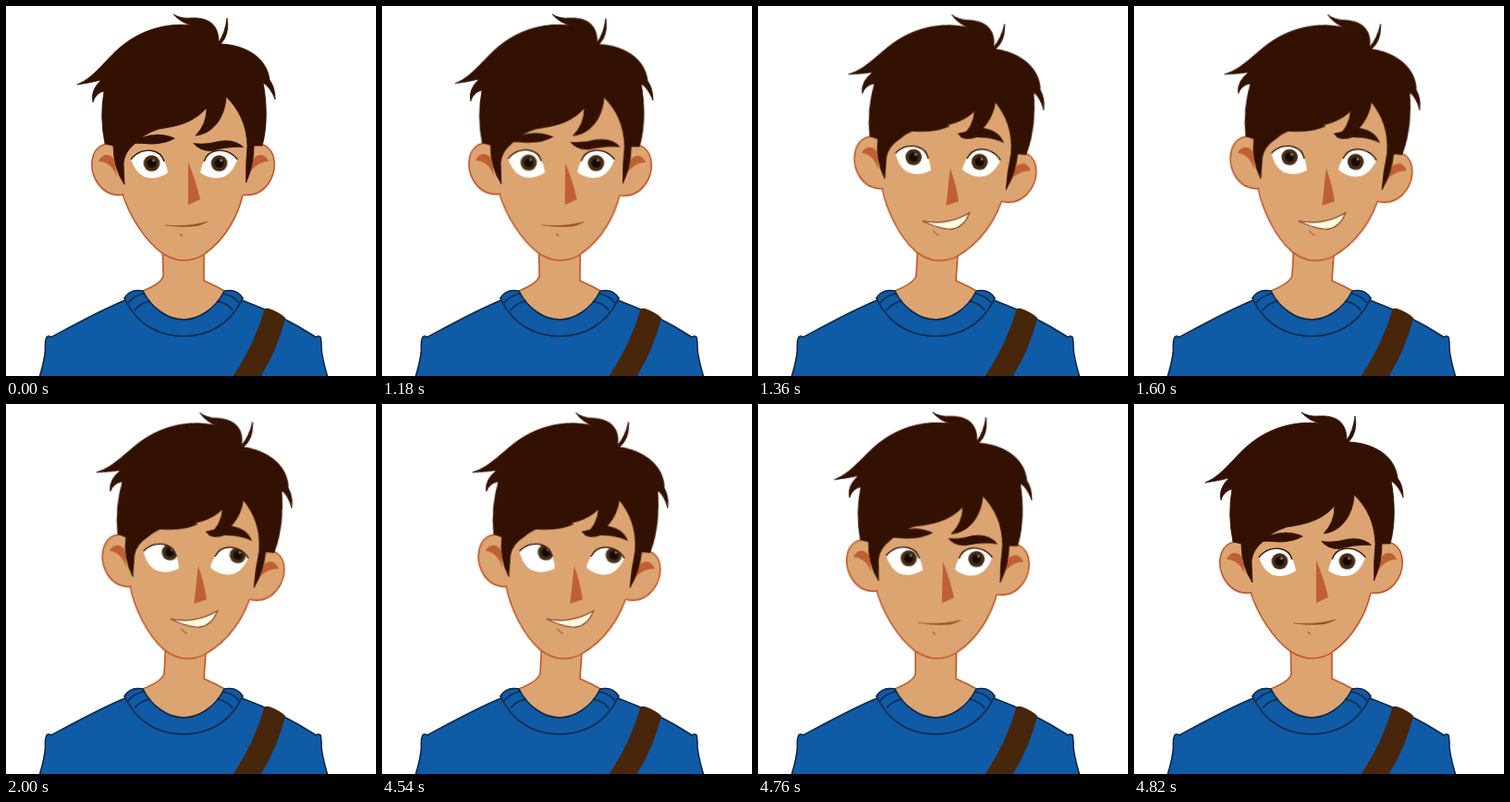
An HTML page for the animation above (5 s loop, 400 by 400 pixels).

```html
<!DOCTYPE html>
<html lang="en">
<head>
<meta charset="utf-8">
<title>Head tilt</title>
<style>
  html, body { margin: 0; width: 100%; height: 100%; overflow: hidden; background: #fff; }
  svg { display: block; width: 100%; height: 100%; }

  .skin { fill: #dca470; }
  .line { fill: none; stroke: #c4562b; stroke-width: 1.6; }
  .shade { fill: #c05f33; }
  .hair { fill: #331102; }
  .seam { fill: none; stroke: #0c2747; stroke-width: 1.6; }

  .move { animation: 5s linear infinite; }

  #head { transform-origin: 192px 275px; animation-name: tilt; }
  @keyframes tilt {
    0%, 23.2%, 96.4%, 100% { transform: rotate(0deg); }
    27.2%, 92% { transform: rotate(6.1deg); }
  }

  #neck { animation-name: neck; }
  @keyframes neck {
    0%, 23.2%, 96.4%, 100% { d: path("M169 255L170 291Q170 299 148 308L160 350L224 350L236 308Q226 302 214 297L214 255"); }
    27.2%, 92% { d: path("M173 255L171 291Q170 299 148 308L160 350L224 350L236 308Q226 302 214 297L217 255"); }
  }

  #nose { animation-name: nose; }
  @keyframes nose {
    0%, 23.2%, 96.4%, 100% { d: path("M197 169Q205 188 210 209L197 215Z"); }
    27.2%, 92% { d: path("M197 174Q205 190 210 209L197 215Z"); }
  }

  #mouth { animation-name: mouth; }
  @keyframes mouth {
    0%, 25.4%, 94%, 100% { d: path("M172 237Q197 239 218 233Q209 238 203 238Q189 239.5 172 237Z"); fill: #9a4c22; stroke-width: .4px; }
    25.8%, 93.6% { fill: #fff9e4; }
    27.2%, 92% { d: path("M173 234Q200 237 223 220Q218 238 203 240Q189 240 173 234Z"); fill: #fff9e4; stroke-width: 1.1px; }
  }

  #chin { animation-name: chin; }
  @keyframes chin {
    0%, 25.4%, 94%, 100% { d: path("M188 246Q189 248 191 249"); }
    27.2%, 92% { d: path("M186 243Q189 247 193 248"); }
  }

  #browL { animation-name: browL; }
  @keyframes browL {
    0%, 23.2%, 96.4%, 100% { d: path("M132 150Q158 132 183 143Q170 151 150 149Q140 148 132 150Z"); }
    27.2%, 92% { d: path("M134 140Q160 118 192 129Q178 138 152 139Q142 139 134 140Z"); }
  }

  #browR { animation-name: browR; }
  @keyframes browR {
    0%, 23.2%, 96.4%, 100% { d: path("M202 148Q216 150 230 146Q248 143 257 153Q240 152 222 157Q209 157 202 148Z"); }
    27.2%, 92% { d: path("M201 136Q214 132 222 127Q245 126 252 141Q240 136 222 138Q209 145 201 136Z"); }
  }

  #eyeL { animation-name: eyeL; }
  @keyframes eyeL {
    0%, 23.2%, 96.4%, 100% { transform: translate(0, 0); }
    27.2%, 92% { transform: translate(1.5px, -1.5px); }
  }

  #eyeR { animation-name: eyeR; }
  @keyframes eyeR {
    0%, 23.2%, 96.4%, 100% { transform: translate(0, 0); }
    27.2%, 92% { transform: translate(0, -6px); }
  }

  #irisL { animation-name: irisL; }
  @keyframes irisL {
    0%, 23.2%, 96.4%, 100% { transform: translate(157.5px, 170px); }
    27.2%, 36% { transform: translate(155px, 168px); }
    40%, 92.8% { transform: translate(163.6px, 164px); }
  }

  #irisR { animation-name: irisR; }
  @keyframes irisR {
    0%, 23.2%, 96.4%, 100% { transform: translate(230.5px, 170px); }
    27.2%, 36% { transform: translate(228px, 170px); }
    40%, 92.8% { transform: translate(238.4px, 163.8px); }
  }
</style>
</head>
<body>
<svg viewBox="0 0 400 400">
  <defs>
    <path id="white" d="M135 166C141 158 150 155 158 156.500C167 158 173 168 175 180C170 184 163 186 157 186C146 186 139 177 135 166Z"/>
    <path id="lid" d="M135 166C141 158 150 155 158 156.500C164 157.500 169 162 171 168" fill="none" stroke="#331102" stroke-width="1.400"/>
    <g id="iris">
      <circle r="8.800" fill="#482c13"/>
      <circle r="4.800" fill="#150a04"/>
      <circle cx="2" cy="-3" r="1.400" fill="#8b8276"/>
    </g>
    <clipPath id="clipL"><use href="#white"/></clipPath>
    <clipPath id="clipR"><use href="#white" transform="translate(385.2) scale(-1 1)"/></clipPath>
  </defs>

  <path id="neck" class="skin move" stroke="#c4562b" stroke-width="1.600" d="M169 255L170 291Q170 299 148 308L160 350L224 350L236 308Q226 302 214 297L214 255"/>

  <g id="shirt">
    <path fill="#0f5ba6" stroke="#0c2747" stroke-width="1.600" d="M36 402C39 392 42 382 42.500 371Q42 362 44 358Q46 356 49 358C75 344 104 328 129 318L128 316C132 309 138 306 148 308C158 328 176 339 192 339C208 339 226 328 236 308C246 306 252 309 256 316L255 318C282 328 309 341 335 358Q338 356 340 358Q341 362 341 371C342 382 345 392 348 402Z"/>
    <path class="seam" d="M129 318C142 344 165 357 192 357C219 357 242 344 255 318"/>
    <path class="seam" d="M132 321Q138 313 149 311M139 329Q145 321 156 319M252 321Q246 313 235 311M245 329Q239 321 228 319"/>
  </g>
  <path fill="#47260c" d="M279 329Q280 326 284 327Q294 330 302 337Q294 371 275 401H245Q269 365 279 329Z"/>

  <g id="head" class="move">
    <g class="skin" stroke="#c4562b" stroke-width="1.600">
      <path d="M124 156C116 147 106 148 100 153C91 161 91 177 97 188C103 199 113 206 128 204Z"/>
      <path d="M260 156C268 147 277 148 283 153C292 161 292 177 286 188C280 199 270 206 255 204Z"/>
    </g>
    <path class="skin" d="M120 120L122 185L127 203C133 226 150 254 170 268Q182 275 192 275Q206 275 216 267C238 251 251 226 256 204L262 185L264 120L238 90H180Z"/>
    <path class="line" d="M126 203C133 226 150 254 170 268Q182 275 192 275Q206 275 216 267C238 251 251 226 256 204"/>
    <path class="shade" d="M100 168C104 159 112 159 117 166L120 184C115 173 109 168 100 168Z"/>
    <path class="shade" d="M284 168C280 159 272 159 267 166L261 184C268 173 275 168 284 168Z"/>

    <path id="nose" class="shade move" d="M197 169Q205 188 210 209L197 215Z"/>
    <path id="mouth" class="move" fill="#9a4c22" stroke="#8c431f" stroke-width=".4" d="M172 237Q197 239 218 233Q209 238 203 238Q189 239.500 172 237Z"/>
    <path id="chin" class="move" fill="none" stroke="#b3592f" stroke-width="1.200" d="M188 246Q189 248 191 249"/>

    <g id="eyeL" class="move">
      <use href="#white" fill="#fff"/>
      <g clip-path="url(#clipL)"><g id="irisL" class="move"><use href="#iris"/></g></g>
      <use href="#lid"/>
    </g>
    <g id="eyeR" class="move">
      <use href="#white" fill="#fff" transform="translate(385.2) scale(-1 1)"/>
      <g clip-path="url(#clipR)"><g id="irisR" class="move"><use href="#iris"/></g></g>
      <use href="#lid" transform="translate(385.2) scale(-1 1)"/>
    </g>

    <path id="browL" class="hair move" d="M132 150Q158 132 183 143Q170 151 150 149Q140 148 132 150Z"/>
    <path id="browR" class="hair move" d="M202 148Q216 150 230 146Q248 143 257 153Q240 152 222 157Q209 157 202 148Z"/>

    <path class="hair" stroke="#331102" stroke-width=".8" d="M77 85C98 76 108 56 128 41C149 25 175 18 201 21Q189 18 181 9Q189 14 200 13C219 12 230 20 230 39Q237 29 239 13Q242 31 232 41C258 42 282 55 285 80Q291 88 291 101Q286 88 278 83C282 104 283 130 277 151L268 151Q268 172 259.500 191Q259 170 261 151C260 128 252 112 238 98C237 119 225 138 205 140Q217 128 217 110C202 127 184 130 165 133Q149 138 139 149Q128 158 127 170L128 193Q116 175 116 151L107 149Q101 120 106 92Q97 94 94 104Q91 91 103 80Q91 83 77 85Z"/>
  </g>
</svg>
</body>
</html>
```
